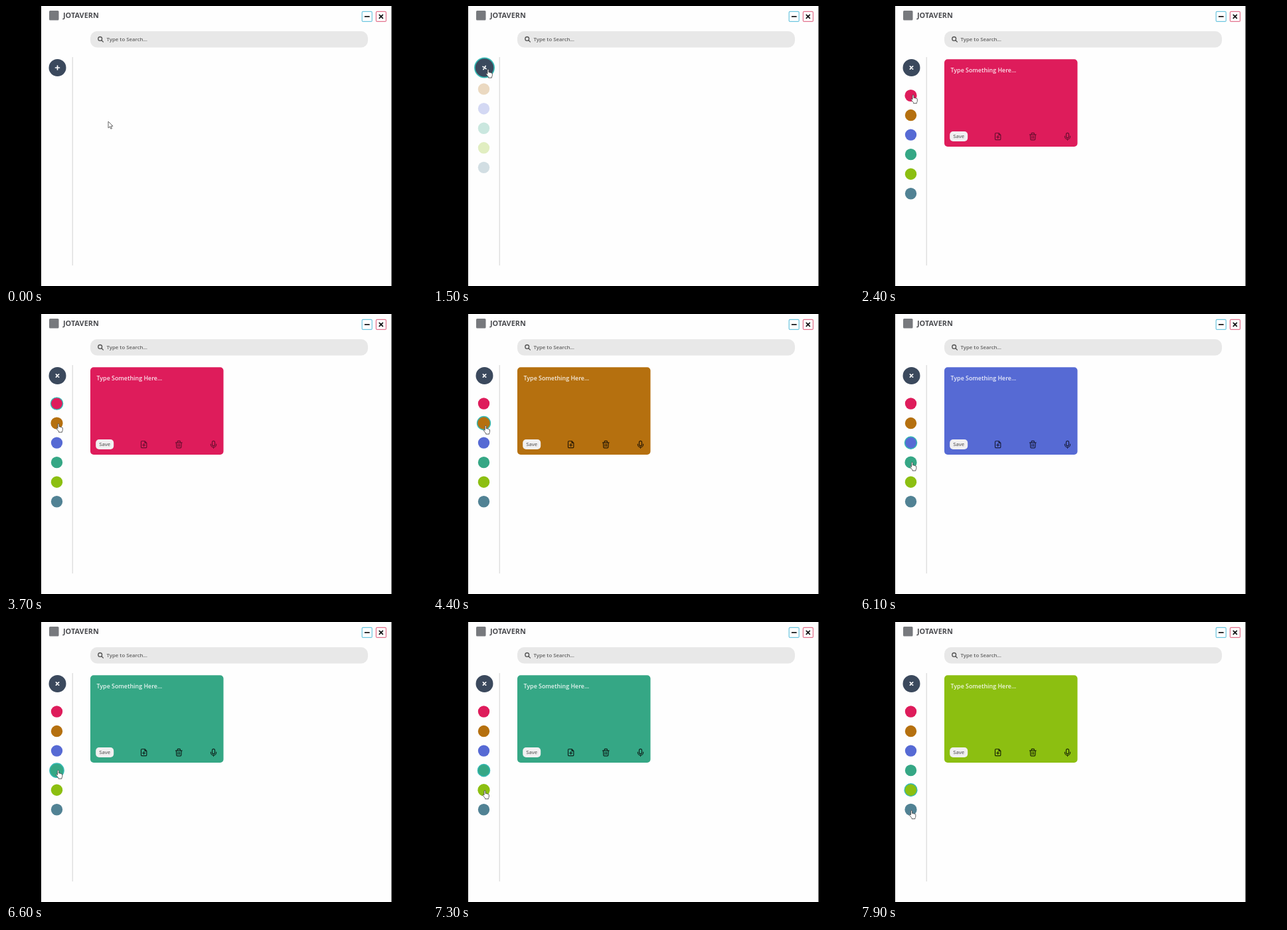
Animation, 634 px wide and 422 px high, one loop 8000 ms. Source, as an HTML page:

```html
<!DOCTYPE html>
<html lang="en">
<head>
<meta charset="utf-8">
<title>Notes</title>
<style>
  html, body { margin: 0; width: 100%; height: 100%; overflow: hidden; background: #000; }
  svg { display: block; }
  text { font-family: "Open Sans", "Noto Sans", sans-serif; }
  .line { fill: none; stroke-linecap: round; stroke-linejoin: round; }
</style>
</head>
<body>
<svg id="stage" width="634" height="422" viewBox="0 0 634 422">
  <rect x="53" width="527.5" height="422" fill="#fefefe"/>

  <rect x="65" y="7" width="14.5" height="14.5" rx="1.5" fill="#77797d"/>
  <text x="86" y="18.3" font-size="10.9" font-weight="700" fill="#4b4c50">JOTAVERN</text>

  <g fill="#fff" stroke-width="1.2">
    <rect x="536.2" y="8.4" width="15" height="15" rx="1.5" stroke="#6cc5df"/>
    <rect x="557.4" y="8.4" width="15" height="15" rx="1.5" stroke="#e2728d"/>
  </g>
  <path class="line" d="M540.7 15.9h6.2M562.3 13.4l5 5m0-5l-5 5" stroke="#18181a" stroke-width="1.9"/>

  <rect x="127" y="38" width="418" height="24.5" rx="10" fill="#e8e8e8"/>
  <g class="line" stroke="#505050" stroke-width="1.3">
    <circle cx="141.7" cy="49.4" r="2.9"/>
    <path d="M144 51.7l2.4 2.4"/>
  </g>
  <text x="151.5" y="53.2" font-size="7.8" font-weight="600" fill="#626262">Type to Search...</text>
  <path d="M100.3 77V391" stroke="#dedede" stroke-width="1.4"/>

  <g id="card">
    <rect id="paper" x="127" y="80.3" width="200.5" height="131.7" rx="5"/>
    <text x="136.5" y="100.3" font-size="8.9" font-weight="600" fill="#fff" fill-opacity=".88">Type Something Here...</text>
    <rect x="135.2" y="189" width="27" height="15" rx="5" fill="#f1f0f1"/>
    <text x="148.6" y="199.4" font-size="7.8" text-anchor="middle" fill="#454545">Save</text>
    <g id="icons" class="line" stroke-width="1.2">
      <path d="M209 191.5h-4.2a1.3 1.3 0 0 0-1.3 1.3v7.6a1.3 1.3 0 0 0 1.3 1.3h5.7a1.3 1.3 0 0 0 1.3-1.3v-6.1zv2.8h2.8M207.6 195.5v4M205.6 197.5h4"/>
      <path d="M255.5 193.8h9.6M258.2 193.6v-1.4q0-.8.8-.8h2.6q.8 0 .8.8v1.4M256.4 194l.4 6.6q.1 1.2 1.2 1.2h4.6q1.1 0 1.2-1.2l.4-6.6M259.1 196.2v3.3M261.5 196.2v3.3"/>
      <path d="M310.5 193.3a2 2 0 0 1 4 0v3.4a2 2 0 0 1-4 0zM308.4 196.2v.5a4.1 4.1 0 0 0 8.2 0v-.5M312.5 200.9v1.4"/>
    </g>
  </g>

  <g id="list"></g>

  <g id="add">
    <circle id="addDisc" r="13" fill="#3b495d"/>
    <path id="plus" class="line" d="M-3 0h6M0-3v6" stroke="#fff" stroke-width="1.7"/>
  </g>

  <path id="arrow" d="M0 0v9.8l2.3-2.1 1.6 3.5 1.6-.7-1.6-3.4h3.1z" fill="#fff" stroke="#555" stroke-width=".9" stroke-linejoin="round"/>
  <path id="hand" d="M-1 1a1 1 0 0 1 2 0v3.5q1.3-.6 1.9.4 1.3-.5 1.8.5 1.6-.2 1.6 1.2v2.6q0 1.3-.9 2.2v1.3h-4.9v-1.2l-3.3-4q-.5-1 .5-1.4.6-.1 1.3.9z" fill="#fff" stroke="#444" stroke-width=".85" stroke-linejoin="round"/>
</svg>
<script>
const LOOP = 8000, TEAL = '#35b9b4';
const COLORS = ['#de1c5b', '#b5700f', '#566ad4', '#35a785', '#8cbf11', '#518294'];
const INK = ['#6b0f30', '#2b1b06', '#1b2040', '#10251f', '#1e2a06', '#14222a'];
const PICKS = [2200, 3950, 5050, 6250, 7350];   // when each colour is chosen
const RING_DELAY = 250;
const ADD = { x: 77.5, y: 93 };
const PATH = [   // time, x, y of the pointer tip
  [0, 154, 174], [200, 155, 179], [800, 83, 95.5], [1800, 83, 95.5],
  [2150, 80, 134], [3000, 80, 134], [3550, 79, 165.5], [4300, 79, 165.5],
  [4800, 80.5, 192.5], [5450, 80.5, 192.5], [6000, 78.5, 223.5], [6750, 78.5, 223.5],
  [7100, 78, 254], [7550, 78, 254], [7850, 77.5, 284], [LOOP, 77.5, 284]
];

const $ = id => document.getElementById(id);
const set = (node, attrs) => {
  for (const key in attrs) node.setAttribute(key, attrs[key]);
  return node;
};
const span = (t, from, length) => Math.min(1, Math.max(0, (t - from) / length));
const smooth = p => p * p * (3 - 2 * p);
const dotY = i => 135 + i * 29.55;
const show = (node, on) => set(node, { visibility: on ? 'visible' : 'hidden' });

const dots = COLORS.map((fill, i) => $('list').appendChild(set(
  document.createElementNS('http://www.w3.org/2000/svg', 'circle'),
  { cx: 76.5, cy: dotY(i), fill, stroke: TEAL })));

function pointer(t) {
  const n = PATH.findIndex(p => p[0] > t);
  const [t0, x0, y0] = PATH[n - 1], [t1, x1, y1] = PATH[n];
  const p = smooth(span(t, t0, t1 - t0));
  return { x: x0 + (x1 - x0) * p, y: y0 + (y1 - y0) * p };
}

function lastPick(t) {
  return PICKS.filter(at => at <= t).length - 1;
}

function render(t) {
  const tip = pointer(t);
  const near = (x, y, r) => Math.hypot(tip.x - x, tip.y - y) < r;

  const open = span(t, 1400, 400);
  set($('list'), { opacity: open, transform: `translate(0 ${-52.7 * (1 - open)})` });

  const ringed = lastPick(t - RING_DELAY);
  let hot = near(ADD.x, ADD.y, 13);
  dots.forEach((dot, i) => {
    const over = open === 1 && near(76.5, dotY(i), 9.5);
    hot = hot || over;
    const ring = i === ringed;
    const pulse = ring ? 1.8 * (1 - smooth(span(t, PICKS[i] + RING_DELAY, 400))) : 0;
    set(dot, { r: (over || ring ? 9.1 : 8.7) + pulse, 'stroke-width': ring ? 1.4 : 0 });
  });

  const grow = smooth(span(t, 1200, 150)) * (1 - smooth(span(t, 1850, 200)));
  set($('add'), { transform: `translate(${ADD.x} ${ADD.y})` });
  set($('addDisc'), { r: 13 + 1.6 * grow, stroke: TEAL, 'stroke-width': 1.7 * grow });
  set($('plus'), { transform: `rotate(${45 * smooth(span(t, 1300, 300))})` });

  const pick = lastPick(t);
  show($('card'), pick >= 0);
  if (pick >= 0) {
    set($('paper'), { fill: COLORS[pick] });
    set($('icons'), { stroke: INK[pick] });
  }

  for (const id of ['arrow', 'hand']) {
    set($(id), { transform: `translate(${tip.x} ${tip.y})` });
    show($(id), hot === (id === 'hand'));
  }
}

const start = performance.now();
function tick() {
  render((performance.now() - start) % LOOP);
  requestAnimationFrame(tick);
}
tick();
</script>
</body>
</html>
```
